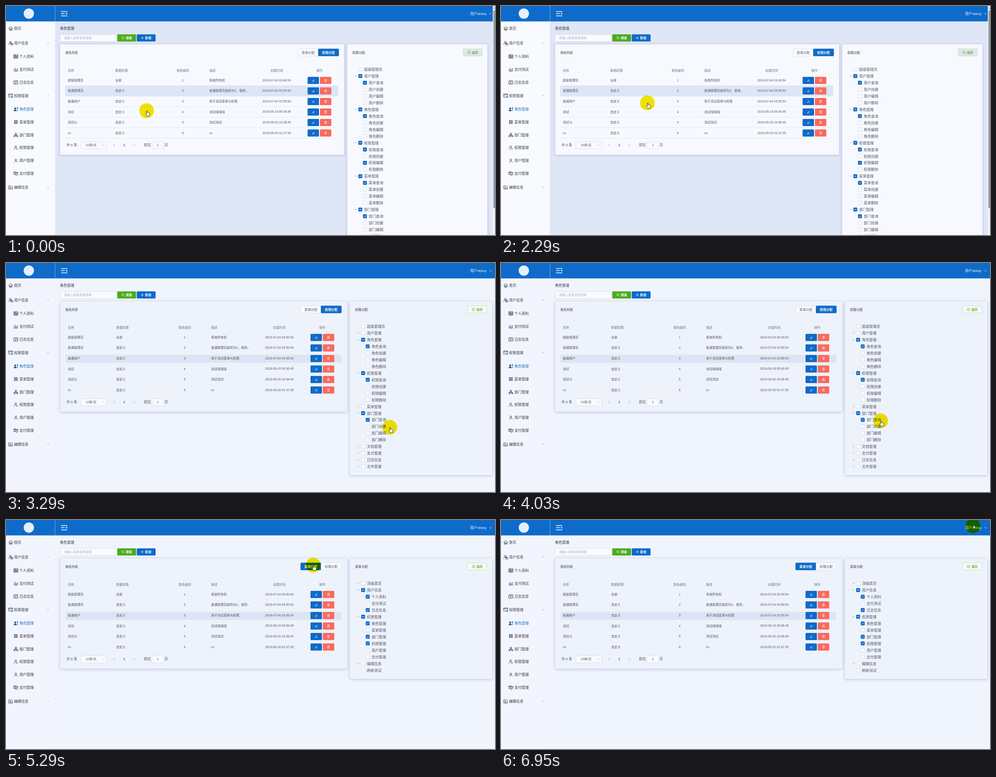
An HTML page for the animation above (7.05 s loop, 1092 px wide and 513 px high).

```html
<!DOCTYPE html>
<html lang="zh-CN">
<head>
<meta charset="utf-8">
<title>角色管理</title>
<style>
  html, body { margin: 0; width: 100%; height: 100%; overflow: hidden; background: #f0f4fd; }
  svg { display: block; width: 1092px; height: 513px; }
  text { font-family: "Liberation Sans", "Noto Sans CJK SC", "Noto Sans CJK", sans-serif; white-space: pre; }
  .card { filter: drop-shadow(0 1px 3px #b3c0da); }
  #spot { mix-blend-mode: multiply; }
</style>
</head>
<body>
<svg id="stage" viewBox="0 0 1092 513"></svg>
<script>
const LOOP = 7050;
const BLUE = '#0f6ac8', INK = '#50545e', DARK = '#34373e', LINE = '#d3d9e6';
const ROW = 14.95;

const rect = (x, y, w, h, fill, extra = '') =>
  `<rect x="${x}" y="${y}" width="${w}" height="${h}" fill="${fill}" ${extra}/>`;
const text = (s, x, y, size = 7, fill = INK, extra = '') =>
  `<text x="${x}" y="${y + size * 0.37}" font-size="${size}" fill="${fill}" ${extra}>${s}</text>`;
const mid = (s, x, y, size, fill, extra = '') =>
  text(s, x, y, size, fill, `text-anchor="middle" ${extra}`);
const path = (d, x, y, color = INK, width = 0.9, fill = 'none') =>
  `<path d="${d}" transform="translate(${x} ${y})" stroke="${color}" stroke-width="${width}" fill="${fill}" stroke-linejoin="round"/>`;
const stroke = (color, r = 1.5) => `stroke="${color}" stroke-width=".8" rx="${r}"`;

const CARET = { up: 'M-2.5 1.2L0-1.2 2.5 1.2', down: 'M-2.5-1.2L0 1.2 2.5-1.2',
                left: 'M1.2-2.5L-1.2 0 1.2 2.5', right: 'M-1.2-2.5L1.2 0-1.2 2.5' };

const ICON = {
  home: 'M-4.5 0L0-4 4.5 0M-3-1V4H3V-1M-1 4V1H1V4',
  people: 'M-3-2a2 2 0 1 0 4 0a2 2 0 1 0-4 0M-4.5 4C-4.5 0 0 0 1 1M0 1.5H4.5V4.5H0ZM1 1.5V0H3.5V1.5',
  table: 'M-4.5-4H4.5V4H-4.5ZM-4.5-1.3H4.5M-4.5 1.3H4.5M-1.5-4V4M1.5-1.3V4',
  chart: 'M-3.6-1V3M-1.2-3.5V3M1.2-.5V3M3.6-2.5V3M-4.5 4H4.5',
  log: 'M-4.5-3H4.5V4H-4.5ZM-2-4.5V-2M2-4.5V-2M-2 0H2.5M-2 2H1',
  screen: 'M4.5-.5V-4H-4.5V3H0M-4.5-1.8H4.5M1.5 1.5H4.5V4H1.5Z',
  role: 'M-3.2-2a1.7 1.7 0 1 0 3.4 0a1.7 1.7 0 1 0-3.4 0M-4.5 3.5C-4 .2 1 .2 1.5 3.5ZM3.5-1V4M2.5-3a1 1 0 1 0 2 0a1 1 0 1 0-2 0',
  grid: 'M-3.5-3.5H-.8V-.8H-3.5ZM.8-3.5H3.5V-.8H.8ZM-3.5.8H-.8V3.5H-3.5ZM.8.8H3.5V3.5H.8Z',
  tree: 'M-1.5-4H1.5V-1.5H-1.5ZM0-1.5V.5M-3 1.5V.5H3V1.5M-4.5 1.5H-1.5V4H-4.5ZM1.5 1.5H4.5V4H1.5Z',
  key: 'M-2.2-2a2 2 0 1 0 4 0a2 2 0 1 0-4 0M-4 4C-4 1-2 .3-.2.3M1 1.5L4 4M3.5 1.2L1.5 4',
  user: 'M-1.8-2a1.8 1.8 0 1 0 3.6 0a1.8 1.8 0 1 0-3.6 0M-3.2 4C-3-.3 3-.3 3.2 4',
  pay: 'M1-.5V-4H-4.5V2H-1M-4.5-2H4.5M4.5-3.5V1C4.5 3 1.5 4.5 1 4.5S-1 3-1 1V-1M0 1L1.2 2.2 3 0',
  edit: 'M4-1V4H-4.5V-3H1M-2.5 0H1M-2.5 2H2M2-1.5L4.5-4',
  pen: 'M-2 1.2L1.2-2 2.3-.9-.9 2.3H-2ZM.8 2.4H2.6',
  bin: 'M-2.5-1.6H2.5M-1-1.6V-2.6H1V-1.6M-1.9-1.6V2.6H1.9V-1.6M-.5 0V1.3M.5 0V1.3'
};

// icon, label, y, caret (top-level entries only)
const MENU = [
  ['home', '首页', 50, ''], ['people', '用户信息', 83, 'up'],
  ['table', '个人资料', 113], ['chart', '支付测试', 142], ['log', '日志信息', 171],
  ['screen', '权限管理', 201, 'up'],
  ['role', '角色管理', 231.5], ['grid', '菜单管理', 260], ['tree', '部门管理', 289],
  ['key', '权限管理', 317.5], ['user', '用户管理', 346.5], ['pay', '支付管理', 375.5],
  ['edit', '编辑信息', 406, 'down']
];

const ROLES = [
  ['超级管理员', '全部', '系统所有权', '2019-07-04 03:40:54'],
  ['普通管理员', '自定义', '普通管理员级别为2，使用...', '2019-07-04 03:50:54'],
  ['普通用户', '自定义', '用于测试菜单与权限', '2019-07-04 03:55:54'],
  ['测试', '自定义', '测试嘻嘻嘻', '2019-09-19 05:36:45'],
  ['测试11', '自定义', '测试测试', '2019-09-20 10:38:40'],
  ['cs', '自定义', 'cs', '2019-09-20 01:47:35']
];

// tree nodes: [label, kind, checked]; kind is leaf, shut, open or child
const leaf = s => [[s, 'leaf']];
const shut = (...names) => names.map(s => [s, 'shut']);
const open = (s, kids, marks) =>
  [[s, 'open'], ...kids.map((k, i) => [k, 'child', marks[i] === '1'])];
const crud = (s, marks = '1000') =>
  open(s + '管理', ['查询', '创建', '编辑', '删除'].map(v => s + v), marks);

const WIDE = { left: 762, cols: [246, 399, 458, 610.5, 706.5], edit: 680, tabs: 658,
               right: 768, rightW: 318, save: 1031, hot: 2, bg: '#f0f4fd', side: '#f2f5fe', card: '#eef2fb' };
const NARROW = { left: 755, cols: [244, 395, 454, 604.5, 700], edit: 673.5, tabs: 652,
                 right: 762, rightW: 313, save: 1021, hot: 1, bg: '#dfe6f5', side: '#f8faff', card: '#f7f9fe' };

const SCENES = [
  { at: 0, ...NARROW, title: '权限分配', tab: 1, bottom: 530, scroll: true,
    tree: [...leaf('超级管理员'), ...crud('用户'), ...crud('角色'), ...crud('权限', '1010'),
           ...crud('菜单'), ...crud('部门')] },
  { at: 2520, ...WIDE, title: '权限分配', tab: 1, bottom: 475,
    tree: [...leaf('超级管理员'), ...shut('用户管理'), ...crud('角色'), ...crud('权限'),
           ...shut('菜单管理'), ...crud('部门'), ...shut('文档管理', '支付管理', '日志信息', '文件管理')] },
  { at: 4830, ...WIDE, title: '菜单分配', tab: 1, bottom: 222,
    tree: [...shut('顶级类目', '用户信息', '权限管理', '编辑信息'), ...leaf('刷新测试')] },
  { at: 5050, ...WIDE, title: '菜单分配', tab: 0, bottom: 356,
    tree: [...shut('顶级类目'),
           ...open('用户信息', ['个人资料', '支付测试', '日志信息'], '101'),
           ...open('权限管理', ['角色管理', '菜单管理', '部门管理', '权限管理', '用户管理', '支付管理'], '101100'),
           ...shut('编辑信息'), ...leaf('刷新测试')] }
];

function header(s) {
  const w = s.scroll ? 1087 : 1092;
  let out = rect(0, 0, w, 34.5, '#0f6bc9') + rect(109, 0, 0.8, 34.5, '#8fbce8') +
    '<circle cx="51" cy="17" r="11.5" fill="#e4effb"/>' +
    path('M-7-5H7M-7-.2H1M-7 4.8H7', 130, 17.5, '#fff', 1.4) +
    path('M3-.2L6.5-2.4V2Z', 130, 17.5, 'none', 0, '#fff') +
    text('用户Velory', 1036.5, 17.5, 7.6, '#fff') +
    path(CARET.down, 1082, 17.5, '#fff', 0.8);
  if (s.scroll) out += rect(1087, 0, 5, 513, '#eef1f6') + rect(1088.5, 10, 3.5, 443, '#9299a6') +
    path('M-1.5 1L0-1 1.5 1', 1090, 5, '#555', 0.8);
  return out;
}

function sidebar(s) {
  return rect(0, 34.5, 109.5, 479, s.side) + MENU.map(([icon, label, y, caret]) => {
    const top = caret !== undefined, active = icon === 'role';
    const color = active ? '#1a70cc' : DARK;
    return path(ICON[icon], top ? 10.5 : 22, y, active ? '#244a78' : color, 0.95, active ? '#244a78' : 'none') +
      text(label, top ? 18 : 30, y, 8, color) +
      (caret ? path(CARET[caret], 94, y, '#8a909c', 0.7) : '');
  }).join('');
}

function toolbar() {
  const bold = 'font-weight="700"';
  return text('角色管理', 120.5, 50, 8, DARK) +
    rect(121, 64, 126, 15.5, '#f9fbff', stroke(LINE)) +
    text('请输入菜单名称搜索', 129.5, 71.5, 6.9, '#aab0bd') +
    rect(248.5, 63.5, 42, 16, '#4bab1c', 'rx="1.5"') +
    path('M-2.6-.5a2.3 2.3 0 1 0 4.6 0a2.3 2.3 0 1 0-4.6 0M1.3 1.2L3 3', 261, 71.5, '#fff', 0.8) +
    text('搜索', 267.5, 71.5, 7, '#fff', bold) +
    rect(292, 63.5, 42, 16, BLUE, 'rx="1.5"') +
    path('M-3 0H3M0-3V3', 304.5, 71.5, '#fff', 0.8) +
    text('新增', 310.5, 71.5, 7, '#fff', bold);
}

function tabs(s) {
  const one = (label, i) => {
    const on = s.tab === i, x = s.tabs + i * 45.5;
    return rect(x, 96, 45.5, 16, on ? BLUE : '#fafbff', stroke(on ? BLUE : LINE)) +
      mid(label, x + 22.8, 104, 7.1, on ? '#fff' : INK, on ? 'font-weight="700"' : '');
  };
  return one('菜单分配', 0) + one('权限分配', 1);
}

function table(s) {
  const [scope, level, desc, made, act] = s.cols;
  const x = s.scroll ? 132 : 133, w = s.left - 13 - x;
  const head = '#6c727e';
  let out = text('名称', 138, 144, 7, head) + text('数据权限', scope, 144, 7, head) +
    mid('角色级别', level, 144, 7, head) + text('描述', desc, 144, 7, head) +
    mid('创建时间', made, 144, 7.1, head) + mid('操作', act, 144, 7, head);
  ROLES.forEach(([name, range, note, time], i) => {
    const y = 166.3 + i * 23.55;
    if (i === s.hot) out += s.scroll ? rect(x, y - 11.5, w, 23.5, '#dce6f6')
                                     : rect(x, y - 7.8, w, 18, '#dce5f4');
    out += rect(x, y + 11.8, w, 0.7, s.scroll ? '#dbe1ee' : '#e9eef8') +
      text(name, 138, y) + text(range, scope, y) + mid(i + 1, level, y, 7, INK) +
      text(note, desc, y) + mid(time, made, y, 6.85, INK) +
      rect(s.edit, y - 7.5, 25.5, 16, BLUE, 'rx="1.5"') +
      path(ICON.pen, s.edit + 12.7, y + 0.6, '#fff', 0.75) +
      rect(s.edit + 27.5, y - 7.5, 25.5, 16, '#f96a5d', 'rx="1.5"') +
      path(ICON.bin, s.edit + 40.2, y + 0.5, '#fff', 0.7);
  });
  return out;
}

function pager() {
  const y = 311.5, gray = '#8d93a0';
  return text('共 6 条', 135, y, 7.7) +
    rect(167, 304, 57.5, 16, '#f8faff', stroke(LINE)) + text('10条/页', 178, y, 7.1) +
    path(CARET.down, 217, y, '#a9b0bd', 0.8) +
    path(CARET.left, 241.5, y, gray, 0.8) + mid('1', 264, y, 7.5, BLUE, 'font-weight="700"') +
    path(CARET.right, 286.5, y, gray, 0.8) + text('前往', 308, y, 7.8) +
    rect(326, 304, 26, 16, '#f8faff', stroke(LINE)) + mid('1', 339, y, 7.3, INK) +
    text('页', 354, y, 7.8);
}

function checkbox(x, y, state) {
  const on = state !== 'off';
  return rect(x - 4, y - 4, 8, 8, on ? BLUE : '#fafbff', stroke(on ? BLUE : '#d0d6e3', 1)) +
    (state === 'half' ? path('M-2.4 0H2.4', x, y, '#fff', 1.1) : '') +
    (state === 'on' ? path('M-2.1 0L-.6 1.6 2.2-1.6', x, y, '#fff', 1) : '');
}

function treeCard(s) {
  const x = s.right, box = s.scroll ? x + 29.2 : x + 29.5;
  let out = rect(x, 86, s.rightW, s.bottom - 86, s.card, 'rx="2" class="card"') +
    text(s.title, x + 11.5, 104, 7.1, DARK) +
    rect(s.save, 96, 42.5, 16, s.scroll ? '#dfe7ea' : '#f6faf8', stroke(s.scroll ? '#c2d3cb' : '#bcdcb5')) +
    path('M-3 0a3 3 0 1 0 6 0a3 3 0 1 0-6 0M-1.4 0L-.3 1.1 1.5-.9', s.save + 13, 104, '#5cb531', 0.8) +
    text('保存', s.save + 19.5, 104, 7, '#5cb531', 'font-weight="700"');
  s.tree.forEach(([label, kind, checked], i) => {
    const y = 142 + i * ROW, bx = box + (kind === 'child' ? 10.3 : 0);
    if (kind === 'open') out += path('M-2-1H2L0 1.3Z', x + 19, y, 'none', 0, '#a8afbd');
    if (kind === 'shut') out += path('M-1-2V2L1.3 0Z', x + 19, y, 'none', 0, '#a8afbd');
    out += checkbox(bx, y, kind === 'open' ? 'half' : checked ? 'on' : 'off') +
      text(label, bx + 8.6, y + 0.2, 8.1);
  });
  return out;
}

const scene = s => '<g class="scene">' + rect(0, 0, 1092, 513, s.bg) + sidebar(s) + toolbar() +
  rect(121, 86, s.left - 121, 247, s.card, 'rx="2" class="card"') +
  text('角色列表', 132.5, 104, 7, DARK) + tabs(s) + table(s) + pager() + treeCard(s) + header(s) + '</g>';

const HAND = 'M-1 .8C-1-.5.8-.5.8.8V4.4L1.4 4.1C2.2 3.8 2.8 4.2 3 4.8 3.8 4.3 4.5 4.7 4.7 5.3 5.5 5 6 5.5 6 6.2V8.5C6 10 5.2 10.6 5 12H-.6C-.9 10.5-2.6 9-3 7.2-3.2 6.2-2 5.8-1 7Z';
const ARROW = 'M0-2V6.6L1.9 4.9 3.1 7.6 4.3 7 3.1 4.4H5.5Z';

const stage = document.getElementById('stage');
stage.innerHTML = SCENES.map(scene).join('') +
  '<circle id="spot" r="16.5" fill="#f8e705"/>' +
  `<g id="pointer"><g id="hand">${path(HAND, 1, 0, '#222', 0.9, '#fff')}</g>` +
  `<g id="arrow">${path(ARROW, 1, 0, '#222', 0.6, '#fff')}</g></g>`;

const views = [...stage.querySelectorAll('.scene')];
const [spot, pointer, hand, arrow] = ['spot', 'pointer', 'hand', 'arrow'].map(id => document.getElementById(id));

// pointer path: time, x, y
const MOVES = [
  [0, 314, 234.5], [100, 314, 234.5], [750, 314, 201], [1540, 314, 201], [2180, 327, 217],
  [2630, 327, 217], [3160, 857, 368], [3810, 857, 368], [4590, 686, 101],
  [5300, 686, 101], [5750, 1039, 18], [5930, 1039, 18], [6200, 1054, 13], [LOOP, 1054, 13]
];

// the screen refreshes in bursts of seven evenly spaced steps
const BURSTS = [[100, 750], [860, 1540], [1640, 2290], [2420, 3050], [3170, 3810],
                [3920, 4590], [4720, 5420], [5530, 6210], [6320, 6950]];
const STEPS = [0, ...BURSTS.flatMap(([a, b]) => Array.from({ length: 7 }, (_, i) => a + (b - a) * i / 6))];

function pointerAt(t) {
  const i = Math.max(1, MOVES.findIndex(m => m[0] >= t));
  const [t0, x0, y0] = MOVES[i - 1], [t1, x1, y1] = MOVES[i];
  const p = (t - t0) / (t1 - t0), e = p * p * (3 - 2 * p);
  return [x0 + (x1 - x0) * e, y0 + (y1 - y0) * e];
}

function draw(now) {
  const time = now % LOOP;
  const t = STEPS.findLast(step => step <= time + 0.5) ?? 0;
  const current = SCENES.findLastIndex(s => s.at <= t);
  views.forEach((v, i) => v.setAttribute('display', i === current ? 'inline' : 'none'));
  const place = `translate(${pointerAt(t).join(' ')})`;
  spot.setAttribute('transform', place);
  pointer.setAttribute('transform', place);
  const pointing = t < 6200;
  hand.setAttribute('display', pointing ? 'inline' : 'none');
  arrow.setAttribute('display', pointing ? 'none' : 'inline');
}

const start = performance.now();
function tick() {
  draw(performance.now() - start);
  requestAnimationFrame(tick);
}
tick();
</script>
</body>
</html>
```
